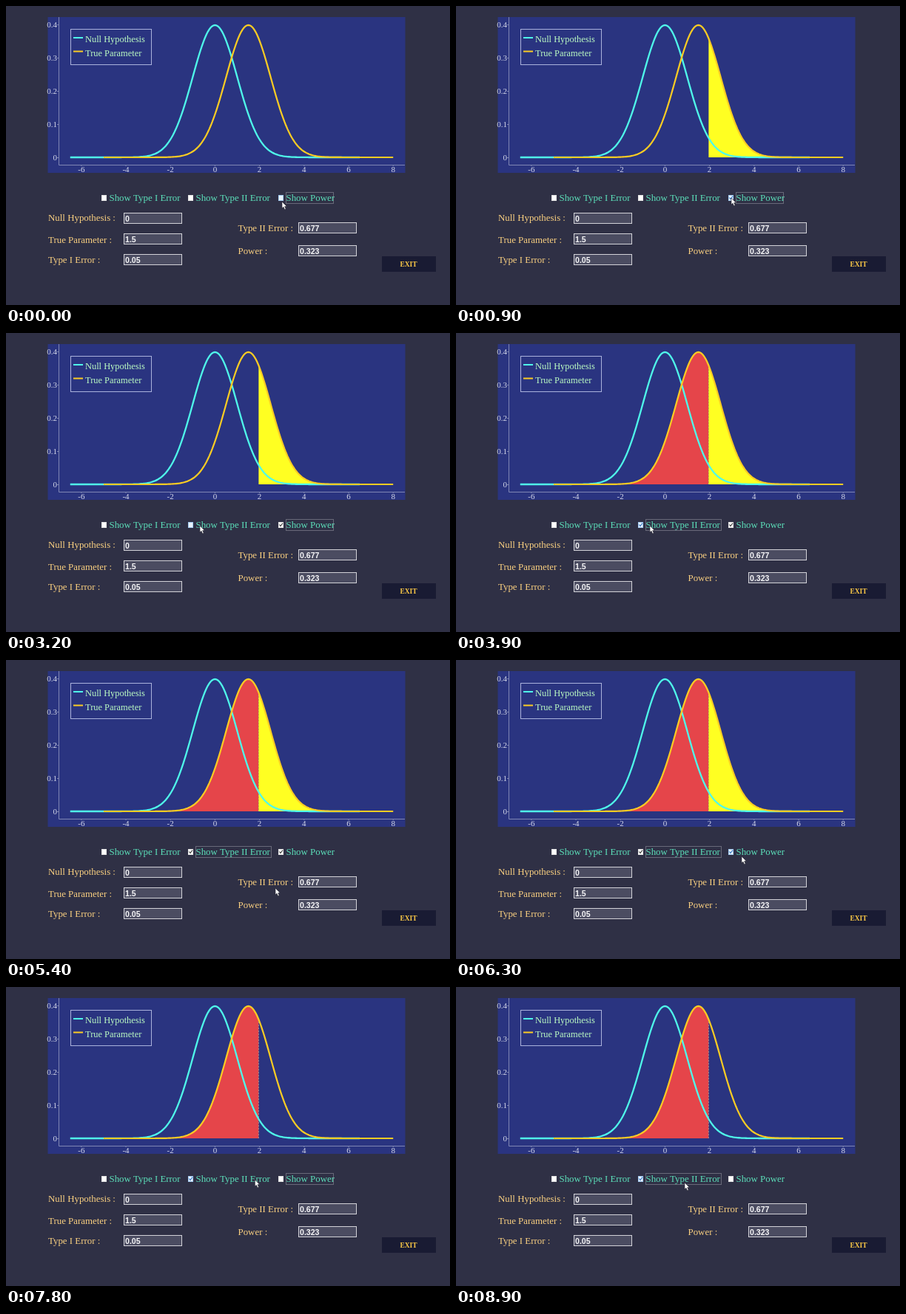
Animation, 600 px wide and 405 px high, one loop 9000 ms. Source, as an HTML page with a canvas:

```html
<!DOCTYPE html>
<html lang="en">
<head>
<meta charset="utf-8">
<title>Type I and Type II errors</title>
<style>
html, body { margin: 0; width: 100%; height: 100%; overflow: hidden; background: #2f3045; }
canvas { display: block; width: 600px; height: 405px; }
</style>
</head>
<body>
<canvas id="stage" width="600" height="405"></canvas>
<script>
const ctx = document.getElementById('stage').getContext('2d');
const LOOP = 9000, STEP = 100;
const SERIF = '"Liberation Serif", serif';
const SANS = '"Liberation Sans", sans-serif';
const CYAN = '#4ff8ea', GOLD = '#fdcd22', MINT = '#5ce0ba', AMBER = '#fad080';
const CUTOFF = 1.96, TRUE_MEAN = 1.5;

const px = x => 282.4 + 30.1 * x;
const py = y => 205 - 449 * y;
const normal = (x, mean) => Math.exp(-((x - mean) ** 2) / 2) / Math.sqrt(2 * Math.PI);

// Pointer stops: time, x, y
const path = [
  [0, 373, 265], [500, 372, 260], [1900, 372, 260], [2600, 265, 261],
  [3100, 262, 261], [3900, 262, 261], [4200, 266, 266], [4700, 330, 388],
  [5400, 364, 309], [6300, 386, 266], [6900, 389, 257], [7300, 389, 257],
  [8100, 312, 263], [8400, 312, 264], [8900, 309, 265]
];

const checks = [
  { label: 'Show Type I Error', x: 129, end: 238 },
  { label: 'Show Type II Error', x: 246, end: 359 },
  { label: 'Show Power', x: 368, end: 443 }
];

const fields = [
  ['Null Hypothesis :', 57, 291, 159, 280, '0'],
  ['True Parameter :', 57, 321, 159, 308, '1.5'],
  ['Type I Error :', 57, 348, 159, 336, '0.05'],
  ['Type II Error :', 313.5, 305, 395, 293, '0.677'],
  ['Power :', 313.5, 336, 395, 324, '0.323']
];

function box(x, y, w, h, fill, stroke) {
  if (fill) {
    ctx.fillStyle = fill;
    ctx.fillRect(x, y, w, h);
  }
  if (stroke) {
    ctx.strokeStyle = stroke;
    ctx.lineWidth = 1;
    ctx.strokeRect(x + .5, y + .5, w - 1, h - 1);
  }
}

function line(points, color, width) {
  ctx.beginPath();
  points.forEach(([x, y]) => ctx.lineTo(x, y));
  ctx.strokeStyle = color;
  ctx.lineWidth = width;
  ctx.stroke();
}

function text(str, x, y, font, color, align = 'left') {
  ctx.font = font;
  ctx.fillStyle = color;
  ctx.textAlign = align;
  ctx.fillText(str, x, y);
}

function bell(mean, from, to) {
  const points = [];
  for (let i = 0; i <= 200; i++) {
    const x = from + (to - from) * i / 200;
    points.push([px(x), py(normal(x, mean))]);
  }
  return points;
}

function area(from, to, color) {
  ctx.beginPath();
  ctx.moveTo(px(from), py(0));
  bell(TRUE_MEAN, from, to).forEach(([x, y]) => ctx.lineTo(x, y));
  ctx.lineTo(px(to), py(0));
  ctx.fillStyle = color;
  ctx.fill();
}

function drawPlot(state) {
  box(56.5, 15, 483, 211, '#2a3480');
  line([[71.5, 15], [71.5, 215.5], [539, 215.5]], '#7f86b4', 1);
  const tick = `11px ${SERIF}`;
  for (let i = 0; i < 5; i++) {
    const y = Math.round(py(i / 10));
    line([[69, y + .5], [72, y + .5]], '#7f86b4', 1);
    text(String(i / 10), 69, y + 4, tick, '#d5d8e8', 'right');
  }
  for (let x = -6; x <= 8; x += 2) {
    line([[px(x), 215], [px(x), 217]], '#7f86b4', 1);
    text(String(x), px(x), 225, tick, '#d5d8e8', 'center');
  }

  if (state.beta) {
    area(-5, CUTOFF, '#e5454a');
    ctx.setLineDash([2, 2]);
    line([[px(CUTOFF), py(0)], [px(CUTOFF), py(normal(CUTOFF, TRUE_MEAN))]], '#98908f', 1);
    ctx.setLineDash([]);
  }
  if (state.power) area(CUTOFF, 8, '#ffff22');
  line(bell(0, -6.5, 6.5), CYAN, 2.3);
  line(bell(TRUE_MEAN, -5, 8), GOLD, 2.2);

  box(87, 31, 110, 49, '#2a3480', '#aab2dc');
  [['Null Hypothesis', CYAN, 43], ['True Parameter', GOLD, 61.5]].forEach(([name, color, y]) => {
    line([[91, y], [104, y]], color, 2);
    text(name, 107, y + 6, `12.4px ${SERIF}`, '#bcfcc2');
  });
}

function drawCheck(item, on, hover, focus) {
  box(item.x, 256, 7, 8, hover ? '#e8f2fc' : '#fff', hover ? '#a4cbf2' : '#e6e6e6');
  if (on) line([[item.x + 1.5, 259.5], [item.x + 3, 261.5], [item.x + 6, 257.5]], hover ? '#2c6fc0' : '#333', 1.1);
  text(item.label, item.x + 10.5, 264, `12.9px ${SERIF}`, MINT);
  if (focus) {
    ctx.setLineDash([1, 1]);
    box(item.x + 10, 252, item.end - item.x - 10, 16, null, '#a2a2ad');
    ctx.setLineDash([]);
  }
}

function drawForm() {
  fields.forEach(([label, x, y, bx, by, value]) => {
    text(label, x, y, `12.9px ${SERIF}`, AMBER);
    box(bx, by, 79, 15, '#4b4c61', '#d2d2d8');
    text(value, bx + 2, by + 12, `bold 10.6px ${SANS}`, '#f5f5f7');
  });
  box(508, 339, 73, 21, '#191b33');
  text('EXIT', 544, 353, `bold 9.5px ${SERIF}`, '#fac846', 'center');
}

function pointerAt(t) {
  const i = path.findIndex(stop => stop[0] > t);
  if (i < 0) return path[path.length - 1].slice(1);
  const [t0, x0, y0] = path[i - 1], [t1, x1, y1] = path[i];
  const u = (t - t0) / (t1 - t0), k = u * u * (3 - 2 * u);
  return [x0 + (x1 - x0) * k, y0 + (y1 - y0) * k];
}

function drawPointer(x, y) {
  ctx.save();
  ctx.translate(x, y);
  ctx.beginPath();
  [[0, 0], [0, 9], [2, 7.2], [3.6, 10.8], [5.2, 10], [3.7, 6.6], [6.4, 6.4]]
    .forEach(([a, b]) => ctx.lineTo(a, b));
  ctx.closePath();
  ctx.fillStyle = '#fff';
  ctx.fill();
  ctx.strokeStyle = '#20202c';
  ctx.lineWidth = .6;
  ctx.stroke();
  ctx.restore();
}

function draw(t) {
  const state = { power: t >= 800 && t < 7300, beta: t >= 3400 };
  const focus = t < 3300 || (t >= 7300 && t < 8700) ? 2 : 1;
  const [mx, my] = pointerAt(t);
  box(0, 0, 600, 405, '#2f3045');
  drawPlot(state);
  checks.forEach((item, i) => {
    const hover = mx >= item.x && mx <= item.end && my >= 252 && my <= 268;
    drawCheck(item, [false, state.beta, state.power][i], hover, focus === i);
  });
  drawForm();
  drawPointer(mx, my);
}

const start = performance.now();
function tick() {
  const t = (performance.now() - start) % LOOP;
  draw(Math.floor(t / STEP) * STEP);
  requestAnimationFrame(tick);
}
tick();
</script>
</body>
</html>
```
